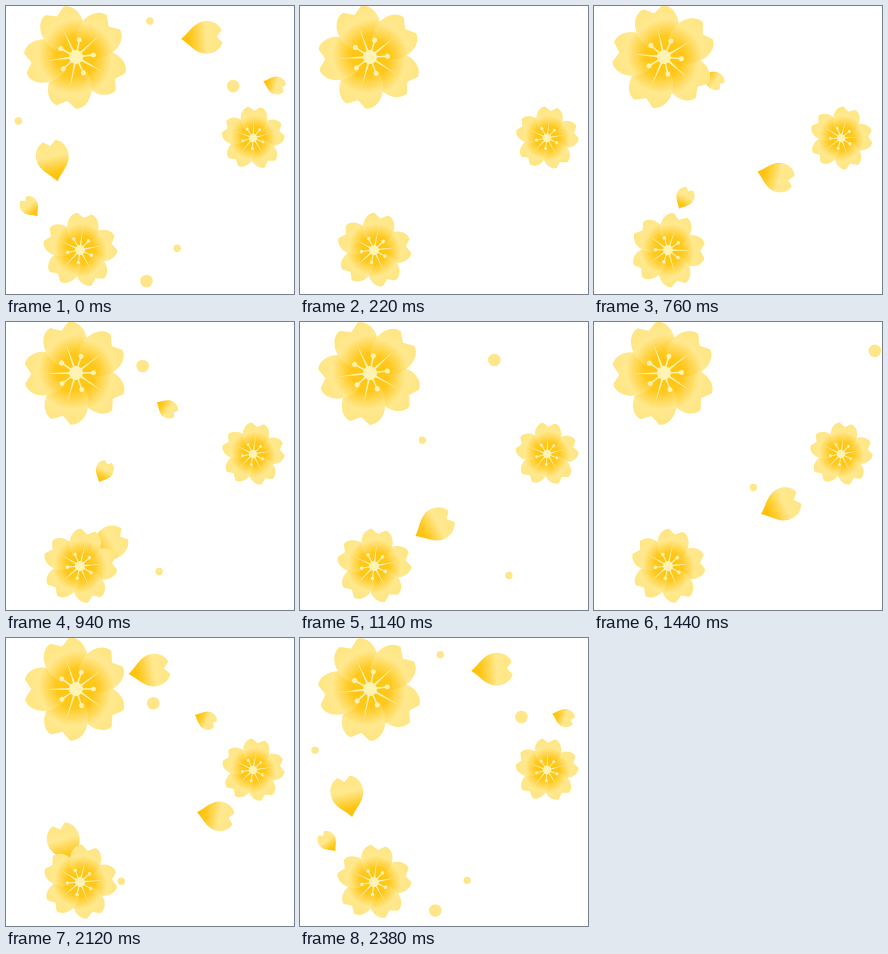
Animation, 288 px wide and 288 px high, one loop 2.4 s. Source, as an HTML page with a canvas:

```html
<!DOCTYPE html>
<html>
<head>
<meta charset="utf-8">
<style>
  html, body { margin: 0; width: 100%; height: 100%; overflow: hidden; background: #fff; }
  canvas { display: block; width: 288px; height: 288px; }
</style>
</head>
<body>
<canvas id="stage" width="288" height="288"></canvas>
<script>
const ctx = document.getElementById('stage').getContext('2d');
const LOOP = 2400, SWING = 1200, TILT = 15;
const PALE = '#ffe68a', CREAM = '#fff3b4';
const rad = deg => deg * Math.PI / 180;

const top1 = { x: 70, y: 51, r: 51.5, angle: 29 };
const low = { x: 74, y: 244, r: 37, angle: -11 };
const side = { x: 247, y: 132, r: 31.3, angle: -15 };
const flowers = [top1, low, side];

// Everything flies out of a flower at a steady speed (px/ms).
// turn: degrees the heading bends per px, lean: extra rotation of the petal
const large = { petal: true, size: 41, speed: .185, turn: .1, lean: 5 };
const small = { petal: true, size: 22.5, speed: .24, turn: -.08, lean: 10 };
const drifter = { petal: true, size: 37, speed: .36, turn: -.19, lean: -32, life: 600 };
const dot = { size: 6.3, speed: .29 };
const spark = { size: 3.7, speed: .28 };
const speck = { size: 3.7, speed: .2 };

const emit = (kind, home, born, heading) => ({ turn: 0, life: LOOP, ...kind, home, born, heading });
const showers = [
  { ends: 950, parts: [
    emit(drifter, top1, 306, 78),
    emit(small, top1, 535, 29),
    emit(small, low, 535, -68),
  ] },
  { ends: 1500, parts: [
    emit(spark, low, 658, 4),
    emit(dot, top1, 710, -6),
    emit(speck, top1, 715, 52),
    emit(large, low, 750, -41),
  ] },
  { ends: LOOP + 20, parts: [
    emit(dot, top1, 1850, 10.5),
    emit(speck, low, 1915, -1),
    emit(speck, top1, 1970, 132),
    emit(speck, top1, 1990, -26),
    emit(dot, low, 2148, 25),
    emit(small, top1, 1566, 24),
    emit(drifter, top1, 1597, 78),
    emit(large, top1, 1710, -21.5),
    emit(large, low, 1895, -116),
    emit(small, low, 2127, -134),
  ] },
];

// Notched petals of unit length, base at the origin, pointing along +x
const flowerPetal = new Path2D(
  'M0 0C.2-.28 .44-.45 .7-.42C.88-.39 .97-.29 .99-.19L.87 0L.99 .19C.97 .29 .88 .39 .7 .42C.44 .45 .2 .28 0 0Z');
const loosePetal = new Path2D(
  'M0 0C.2-.14 .34-.4 .62-.4C.82-.4 .96-.28 1-.15L.87 0L1 .15C.96 .28 .82 .4 .62 .4C.34 .4 .2 .14 0 0Z');

function shade(gradient, ...stops) {
  stops.forEach(([at, color]) => gradient.addColorStop(at, color));
  return gradient;
}
const flowerFill = shade(ctx.createRadialGradient(.06, .06, 0, .06, .06, .9),
  [0, '#ffc40a'], [.36, '#ffc81c'], [.74, '#ffe88f'], [1, '#ffe684']);
const looseFill = shade(ctx.createLinearGradient(0, 0, 1, 0),
  [0, '#ffbe00'], [.25, '#ffc81c'], [.62, '#ffe88f'], [1, '#ffe684']);

function disc(x, y, r, color) {
  ctx.fillStyle = color;
  ctx.beginPath();
  ctx.arc(x, y, r, 0, 2 * Math.PI);
  ctx.fill();
}

function place(x, y, angle, scale, draw) {
  ctx.save();
  ctx.translate(x, y);
  ctx.rotate(rad(angle));
  ctx.scale(scale, scale);
  draw();
  ctx.restore();
}

function around(draw) {
  for (let i = 0; i < 5; i++) {
    draw();
    ctx.rotate(rad(72));
  }
}

function drawFlower({ x, y, r, angle }, tilt) {
  place(x, y, angle + tilt, r, () => {
    ctx.fillStyle = flowerFill;
    around(() => ctx.fill(flowerPetal));
    ctx.fillStyle = CREAM;
    around(() => {
      ctx.beginPath();
      ctx.moveTo(0, -.025);
      ctx.lineTo(.62, 0);
      ctx.lineTo(0, .025);
      ctx.fill();
    });
    ctx.rotate(rad(36));
    around(() => {
      ctx.fillRect(0, -.015, .34, .03);
      disc(.34, 0, .048, CREAM);
    });
    disc(0, 0, .135, CREAM);
  });
}

function drawPart({ petal, size, speed, turn, lean, life, home, born, heading }, t) {
  const age = t - born;
  if (age < 0 || age > life) return;
  const distance = speed * age, bearing = heading + turn * distance;
  const x = home.x + distance * Math.cos(rad(bearing));
  const y = home.y + distance * Math.sin(rad(bearing));
  if (!petal) return disc(x, y, size, PALE);
  place(x, y, bearing + lean, size, () => {
    ctx.translate(-.52, 0);
    ctx.fillStyle = looseFill;
    ctx.fill(loosePetal);
  });
}

function render(now) {
  let t = now % LOOP;
  const tilt = TILT * (1 - Math.cos(2 * Math.PI * t / SWING)) / 2;
  if (t < 20) t += LOOP; // the last shower ends just after the loop point
  ctx.clearRect(0, 0, 288, 288);
  for (const { ends, parts } of showers) {
    if (t < ends) parts.forEach(part => drawPart(part, t));
  }
  flowers.forEach(flower => drawFlower(flower, tilt));
}

const start = performance.now();
function tick() {
  render(performance.now() - start);
  requestAnimationFrame(tick);
}
tick();
</script>
</body>
</html>
```
